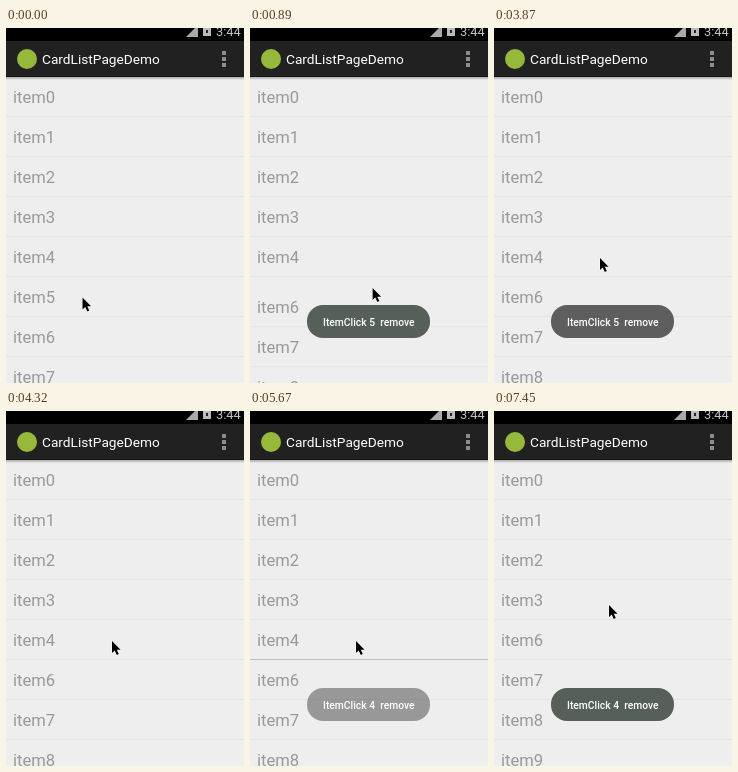
These frames come from a looping animation (238 by 355 pixels, 8000 ms). An HTML page with a canvas:

```html
<!DOCTYPE html>
<html lang="en">
<head>
<meta charset="utf-8">
<title>List item removal</title>
<style>
  html, body { margin: 0; height: 100%; overflow: hidden; background: #eee; }
  canvas { display: block; }
</style>
</head>
<body>
<canvas id="stage" width="238" height="355"></canvas>
<script>
const ctx = document.getElementById('stage').getContext('2d');
const LOOP = 8000, TICK = 148.9, LEAD = 12.5;
const ROW = 40, TOP = 49, TOAST_END = 25;

// All times below are in ticks; the picture only changes on a tick.
const removals = [
  { start: 1, item: 5, gone: -1 },
  { start: 35, item: 4, gone: 5 }
];
const moves = [
  { start: 4, end: 10, x: 142, y: 256 },
  { start: 15, end: 19, x: 106, y: 230 },
  { start: 46, end: 50, x: 115, y: 194 }
];

const progress = (t, start, end) => Math.max(0, Math.min(1, (t - start) / (end - start)));
const smooth = p => p * p * (3 - 2 * p);
const easeOut = (p, power) => 1 - (1 - p) ** power;

function rect(x, y, w, h, color) {
  ctx.fillStyle = color;
  ctx.fillRect(x, y, w, h);
}

function text(str, x, y, size, color, weight = 400) {
  ctx.font = `${weight} ${size}px Roboto, sans-serif`;
  ctx.fillStyle = color;
  ctx.fillText(str, x, y);
}

function drawList({ item: target, gone }, step) {
  const slide = ROW * smooth(progress(step, 3, 6));
  let y = TOP;
  for (let item = 0; item < 11; item++) {
    if (item === gone) continue;
    const removing = item === target && step >= 0;
    if (removing) {
      ctx.globalAlpha = 1 - progress(step, 0, 2);
      rect(0, y, 238, ROW, '#cdcdcd');
      ctx.globalAlpha = 1 - progress(step, 3, 5);
    }
    rect(0, y + 39, 238, 1, removing && step > 1 ? '#bdbdbd' : '#e4e4e4');
    text('item' + item, 7, y + 26, 16.6, '#999');
    ctx.globalAlpha = 1;
    y += removing ? ROW - slide : ROW;
  }
}

function drawBars() {
  rect(0, 0, 238, 13, '#000');
  rect(0, 13, 238, 36, '#212121');
  const shadow = ctx.createLinearGradient(0, 48, 0, 52);
  shadow.addColorStop(0, 'rgba(0,0,0,.4)');
  shadow.addColorStop(1, 'rgba(0,0,0,0)');
  rect(0, 48, 238, 4, shadow);

  ctx.fillStyle = '#aaa';
  ctx.fill(new Path2D('M180 9L192 -3V9Z'));
  rect(197, 0, 8, 8, '#bbb');
  rect(200, 2, 2, 3, '#222');
  text('3:44', 210, 8, 12.8, '#c4c4c4');

  ctx.fillStyle = '#96b93c';
  ctx.beginPath();
  ctx.arc(21, 31, 10, 0, 7);
  ctx.fill();
  text('CardListPageDemo', 36, 36, 13.7, '#fff');
  for (let y = 23; y < 36; y += 6) rect(216, y, 4, 4, '#8c8c8c');
}

function drawToast(item, alpha) {
  if (!alpha) return;
  ctx.globalAlpha = alpha;
  ctx.fillStyle = alpha < 1 ? '#555' : '#566058';
  ctx.beginPath();
  ctx.roundRect(57, 277, 123, 33, 16);
  ctx.fill();
  ctx.globalAlpha = 1;
  text(`ItemClick ${item}\u00a0 remove`, 73, 298, 10.3, '#fff', 500);
}

function drawPointer(tick) {
  let x = 76.5, y = 269.5;
  for (const move of moves) {
    const p = easeOut(progress(tick, move.start, move.end), 3);
    x += (move.x - x) * p;
    y += (move.y - y) * p;
  }
  const arrow = new Path2D('M0 0V12L2.7 9.5L4.8 14L6.8 13.1L4.8 8.8H8.6Z');
  ctx.save();
  ctx.translate(x, y);
  ctx.strokeStyle = '#fff';
  ctx.stroke(arrow);
  ctx.fillStyle = '#000';
  ctx.fill(arrow);
  ctx.restore();
}

function draw(now) {
  const tick = Math.floor((now % LOOP + LEAD) / TICK);
  const removal = removals[tick < removals[1].start ? 0 : 1];
  const step = tick - removal.start;
  const shown = easeOut(progress(step, 2, 5), 2);
  const faded = removal === removals[0] ? progress(tick, TOAST_END, TOAST_END + 4) : 0;

  rect(0, 0, 238, 355, '#eee');
  drawList(removal, step);
  drawBars();
  drawToast(removal.item, shown * (1 - faded ** 2));
  drawPointer(tick);
}

function frame() {
  draw(performance.now());
  requestAnimationFrame(frame);
}
frame();
</script>
</body>
</html>
```
